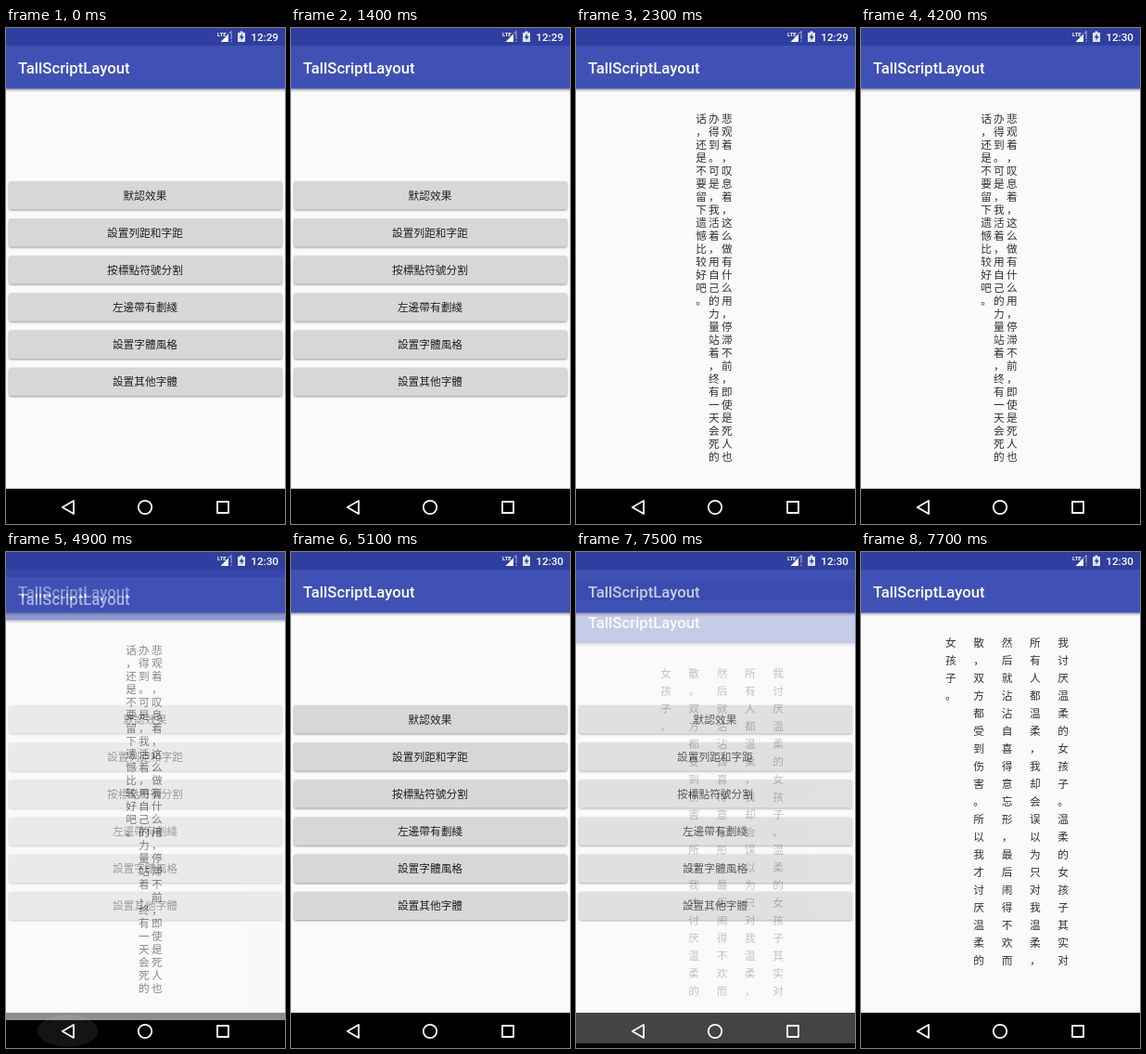
An HTML page that plays this animation: 301 px wide and 534 px high, repeating every 8000 ms.

```html
<!DOCTYPE html>
<html lang="zh-CN">
<head>
<meta charset="utf-8">
<style>
  html, body { margin: 0; height: 100%; overflow: hidden; background: #000; }
  svg { display: block; width: 100vw; height: 100vh; }
  .cjk { font: 11.7px "Noto Sans CJK SC", "Noto Sans CJK TC", "Noto Sans CJK JP", "Noto Sans CJK", sans-serif; text-anchor: middle; }
  .title { font: 500 16.7px Roboto, sans-serif; fill: #fff; }
  .clock { font: 500 11.7px Roboto, sans-serif; fill: #fff; }
  .net { font: 700 6px Roboto, sans-serif; fill: #fff; }
</style>
</head>
<body>
<svg id="stage" viewBox="0 0 301 534"></svg>
<script>
const labels = ['默認效果', '設置列距和字距', '按標點符號分割', '左邊帶有劃綫', '設置字體風格', '設置其他字體'];
const dense = [
  '悲观着，叹息着，这么做有什么用，停滞不前，即使是死人也',
  '办得到。可是，我活着，用自己的力量站着，终有一天会死的',
  '话，还是不要留下遗憾比较好吧。'
];
const loose = [
  '我讨厌温柔的女孩子。温柔的女孩子其实对',
  '所有人都温柔，我却会误以为只对我温柔，',
  '然后就沾沾自喜得意忘形，最后闹得不欢而',
  '散，双方都受到伤害。所以我才讨厌温柔的',
  '女孩子。'
];

const rect = (x, y, w, h, fill, more = '') =>
  `<rect x="${x}" y="${y}" width="${w}" height="${h}" fill="${fill}" ${more}/>`;

const glyphs = (s, x, y, fill) =>
  `<text class="cjk" x="${x}" y="${y + 4.4}" fill="${fill}">${s}</text>`;

const page = (id, body) => `<g id="${id}">
  ${rect(0, 60, 301, 436, '#fafafa')}
  ${rect(0, 15, 301, 50.5, '#3f51b5')}
  ${rect(0, 0, 301, 19, '#303f9f')}
  ${rect(0, 65.5, 301, 3.5, 'url(#shade)')}
  <text class="title" x="13" y="49">TallScriptLayout</text>
  ${body}</g>`;

// Columns run from right to left
const columns = (cols, x, dx, dy) => cols.map((col, c) =>
  [...col].map((ch, r) => glyphs(ch, x - c * dx, 97.3 + r * dy, '#333')).join('')).join('');

const buttons = labels.map((s, i) => {
  const y = 165 + i * 40.15;
  return rect(3.3, y, 294.4, 30.3, '#d6d7d7', `rx="1.7" id="btn${i}"`)
    + glyphs(s, 150, y + 15.2, '#212121');
}).join('');

const $ = id => document.getElementById(id);

$('stage').innerHTML = `
  <defs>
    <linearGradient id="shade" x2="0" y2="1">
      <stop stop-opacity=".32"/><stop offset="1" stop-opacity="0"/>
    </linearGradient>
  </defs>
  ${rect(0, 0, 301, 534, '#000')}
  ${page('home', buttons)}
  ${page('first', columns(dense, 162.75, 13.8, 14))}
  ${page('second', columns(loose, 218.2, 30.35, 19.03))}
  <text class="net" x="228" y="8.5">LTE</text>
  <path d="M231.5 15H240V6.5Z" fill="#fff"/>
  <path d="M240 6.5L243 3.5V12M243 13.5V15" fill="none" stroke="#fff" stroke-opacity=".6"/>
  <path d="M250 5h2.5v-1.5h3v1.5h2.5v10h-8z" fill="#fff" fill-opacity=".85"/>
  <path d="M254.7 6l-3 4.5h2v3l3-4.5h-2z" fill="#303f9f"/>
  <text class="clock" id="clock" x="264.3" y="13.5"></text>
  <ellipse id="tap" cx="66.5" cy="515.5" rx="33" ry="17" fill="#fff"/>
  <g fill="none" stroke="#fff" stroke-width="1.8" stroke-linejoin="round">
    <path d="M60.8 516L73 509V523Z"/>
    <circle cx="150" cy="516" r="7.2"/>
    <path d="M228 510h12v12h-12z"/>
  </g>`;

const clamp = v => Math.max(0, Math.min(1, v));

function place(id, y, alpha) {
  $(id).setAttribute('transform', `translate(0 ${Math.round(y)})`);
  $(id).setAttribute('opacity', alpha);
}
const enter = (id, ms) => place(id, 43 * clamp(1 - ms / 350) ** 3, 1 - clamp(1 - ms / 200) ** 2);
const leave = (id, ms) => place(id, 43 * clamp(ms / 250) ** 4, 1 - clamp((ms - 100) / 150));

function lift(i, k) {
  $('btn' + i).style.filter = `drop-shadow(0 ${1 + k * 0.6}px ${1 + k * 0.5}px #0006)`;
}
labels.forEach((s, i) => lift(i, 0));

// The screen advances in steps of 100 ms
function draw() {
  const s = Math.floor(performance.now() % 8000 / 100);
  $('clock').textContent = s < 42 ? '12:29' : '12:30';

  lift(0, s < 23 ? clamp((s - 13) / 2) : 0);
  lift(1, s < 73 ? clamp((s - 64) / 3) : 0);

  if (s < 21 || s > 50) place('first', 0, 0);
  else if (s < 48) enter('first', 147 + (s - 21) * 100);
  else leave('first', 100 + (s - 48) * 65);

  if (s < 75) place('second', 0, 0);
  else enter('second', 29 + (s - 75) * 160);

  $('tap').setAttribute('opacity', s < 46 || s > 50 ? 0 : 0.2 - Math.abs(s - 47) * 0.06);
  requestAnimationFrame(draw);
}
draw();
</script>
</body>
</html>
```
